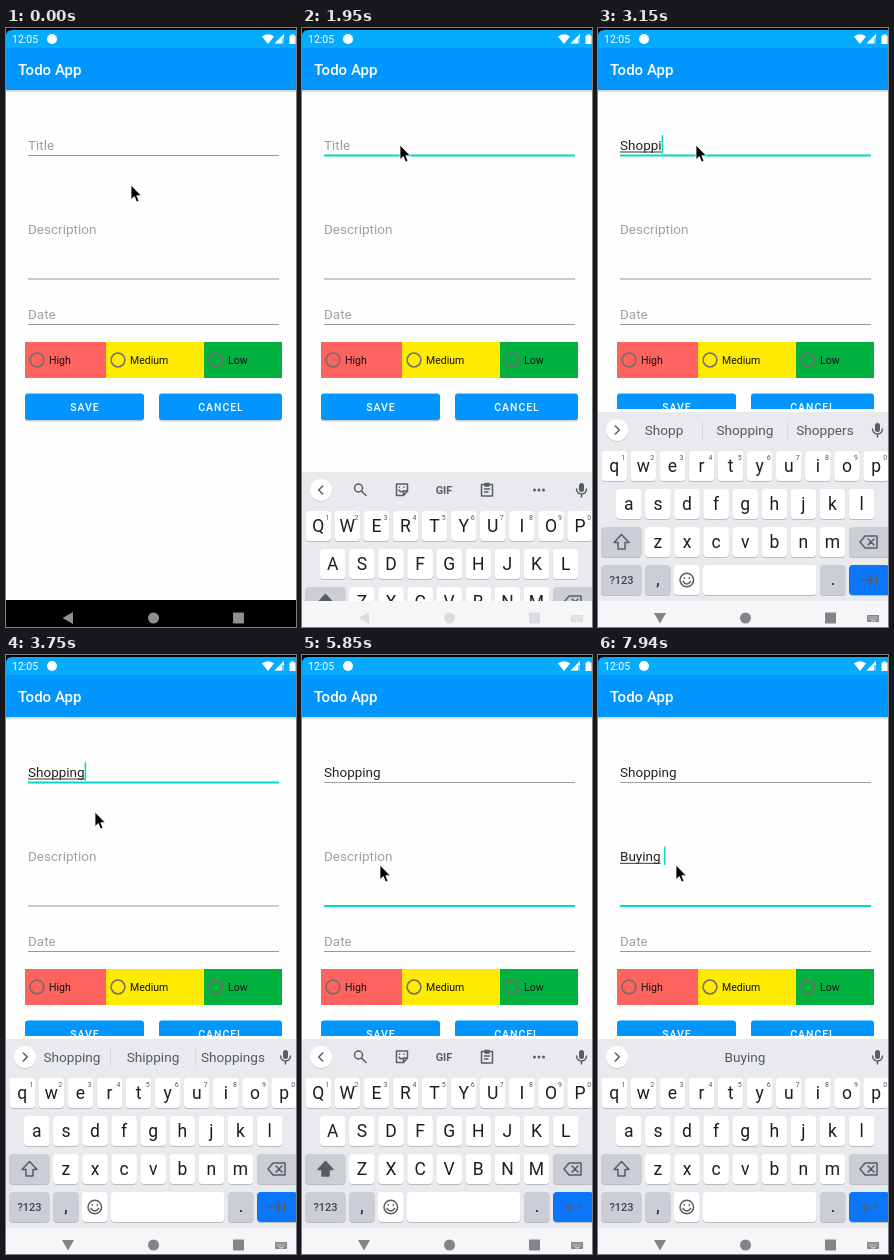
Write an HTML page that moves like this. It is 290 px wide and 599 px high and loops after 8000 ms.

```html
<!DOCTYPE html>
<html lang="en">
<head>
<meta charset="utf-8">
<title>Todo App</title>
<style>
  html, body { margin: 0; width: 100%; height: 100%; overflow: hidden; background: #fff; }
  svg { display: block; width: 100vw; height: 100vh; }
  text { font-family: Roboto, sans-serif; white-space: pre; }
  .mid { text-anchor: middle; }
  .bar { font-size: 15px; font-weight: 500; fill: #fff; }
  .field { font-size: 13.5px; fill: #222; }
  .hint { fill: #a0a0a0; }
  .label { font-size: 10.5px; fill: #111; }
  .button { font-size: 10.5px; font-weight: 500; letter-spacing: .94px; fill: #fff; }
  .key { font-size: 17.5px; fill: #1c1d20; }
  .digit { font-size: 7px; fill: #55585d; }
  .word { font-size: 13.6px; fill: #55595e; }
  .line { fill: none; stroke: #595d62; stroke-width: 1.5; stroke-linecap: round; stroke-linejoin: round; }
</style>
</head>
<body>
<svg viewBox="0 0 290 599" preserveAspectRatio="none">
  <defs>
    <linearGradient id="shade" x2="0" y2="1">
      <stop stop-color="#000" stop-opacity=".2"/><stop offset="1" stop-color="#000" stop-opacity="0"/>
    </linearGradient>
    <clipPath id="clip"><rect id="clipBox" width="295" height="572"/></clipPath>
  </defs>

  <rect width="290" height="599" fill="#fefefe"/>
  <rect width="290" height="10"/>
  <path d="M0 20V8Q0 2 6 2H290V20Z" fill="#06aaff"/>
  <text x="6" y="15" font-size="10.5" fill="#fff">12:05</text>
  <circle cx="46" cy="11" r="5" fill="#fff"/>
  <path d="M256 8.5Q262 4 268 8.5L262 16ZM283.500 7.500H285V6.500H288V7.500H289.500V16H283.500Z" fill="#fff"/>
  <path d="M278 6V15.500H268.500Z" fill="#fff" fill-opacity=".4"/>
  <path d="M278 6V10H276V15.500H268.500Z" fill="#fff"/>
  <rect y="20" width="290" height="42" fill="#0095ff"/>
  <rect y="62" width="290" height="3" fill="url(#shade)"/>
  <text class="bar" x="12" y="47">Todo App</text>

  <g id="form" clip-path="url(#clip)"></g>
  <g id="keyboard"></g>
  <g id="nav">
    <rect id="navBack" y="572" width="290" height="27"/>
    <g id="navIcons">
      <path id="back" d="M56.500 590L67 584V596Z"/>
      <circle cx="147.500" cy="590" r="5.500"/>
      <rect x="227" y="584.500" width="11" height="11" rx="1"/>
      <g id="switcher">
        <rect x="269" y="587" width="12" height="7" rx=".8"/>
        <path id="dots" d="M270.500 589H280M270.500 591H280" stroke-dasharray="1 1" fill="none"/>
        <path id="spaceDot" d="M273 592.800H277.500" fill="none" stroke-width=".8"/>
      </g>
    </g>
  </g>
  <path id="pointer" d="M0 0V14.500L3.300 11.500 5.600 17 8 16 5.800 10.700H10.300Z" stroke="#fff" stroke-width=".8"/>
</svg>

<script>
const $ = id => document.getElementById(id);
const LOOP = 8000, TEAL = '#03dac5';

function add(parent, tag, attrs, text = '') {
  const el = document.createElementNS('http://www.w3.org/2000/svg', tag);
  set(el, attrs);
  el.textContent = text;
  return parent.appendChild(el);
}
function set(el, attrs) {
  for (const name in attrs) el.setAttribute(name, attrs[name]);
}
function show(el, on) {
  el.setAttribute('display', on ? 'inline' : 'none');
}
const write = (parent, cls, x, y, text) => add(parent, 'text', { class: cls, x, y }, text);
const box = (parent, x, y, width, height, fill, rx = 0) =>
  add(parent, 'rect', { x, y, width, height, fill, rx });
const icon = (parent, d, more = {}) => add(parent, 'path', { class: 'line', d, ...more });

// Form
const form = $('form');
function makeField(hint, baseline, lineY) {
  return {
    hint, baseline, lineY,
    text: write(form, 'field', 22, baseline, hint),
    rule: box(form, 22, lineY, 251, 1, '#999'),
    mark: box(form, 22, baseline + 1.8, 0, 1, '#333'),
    caret: box(form, 0, baseline - 14.5, 1.5, 18.5, TEAL)
  };
}
const fields = {
  title: makeField('Title', 121.7, 127),
  note: makeField('Description', 206, 250.5),
  date: makeField('Date', 290.7, 296)
};
[['High', 19, 81, '#ff635f'], ['Medium', 100, 98, '#ffeb00'], ['Low', 198, 78, '#00b140']]
  .forEach(([name, x, width, color]) => {
    box(form, x, 314, width, 36, color);
    add(form, 'circle', { cx: x + 12, cy: 332, r: 6.9, fill: 'none', stroke: '#706f6c', 'stroke-width': 1.5 });
    write(form, 'label', x + 24, 336, name);
  });
[['SAVE', 19, 119], ['CANCEL', 153, 123]].forEach(([name, x, width]) => {
  box(form, x, 367, width, 26.500, '#00000030', 3);
  box(form, x, 365.5, width, 26.500, '#0095ff', 3);
  write(form, 'button mid', x + width / 2 + .5, 383, name);
});

// Keyboard
const board = $('keyboard');
box(board, 0, 384, 295, 216, '#e8eaed');
function makeKey(x, y, width, fill = '#fff') {
  box(board, x, y + 1, width, 30, '#b9bcc1', 4);
  box(board, x, y, width, 30, fill, 4);
}
const letters = [];
['qwertyuiop', 'asdfghjkl', 'zxcvbnm'].forEach((row, r) => {
  [...row].forEach((letter, i) => {
    const x = [16.2, 30.8, 59.9][r] + i * 29.1, y = 423 + r * 38;
    makeKey(x - 12.8, y, 25.6);
    letters.push(write(board, 'key mid', x, y + 21, letter));
    if (!r) write(board, 'digit mid', x + 9, y + 9, (i + 1) % 10);
  });
});
const GREY = '#cbced4';
[[3, 499, 40.5, GREY], [251, 499, 40.5, GREY], [3, 537, 40.5, GREY], [47, 537, 25.6, GREY],
 [76, 537, 25.6], [105, 537, 113.5], [222, 537, 25.6, GREY], [251, 537, 40.5, '#0a76fb']]
  .forEach(key => makeKey(...key));
write(board, 'mid', 23.5, 556, '?123').style.cssText = 'font-size:11px;font-weight:500;fill:#404348';
write(board, 'key mid', 60, 557, ',');
write(board, 'key mid', 235, 557, '.');
const shift = icon(board, 'M23.500 506.500L31 514.500H27V521H20V514.500H16Z');
icon(board, 'M262 514L267 508H279V520H267ZM270 511L276 517M276 511L270 517');
add(board, 'circle', { class: 'line', cx: 88.800, cy: 552, r: 6.800 });
icon(board, 'M86.300 549.800V550.200M91.300 549.800V550.200', { 'stroke-width': 2 });
icon(board, 'M85 553.500Q88.800 558.500 92.600 553.500');
const WHITE = { stroke: '#fff', 'stroke-width': 1.8 };
const tabIcon = icon(board, 'M262.500 552H275M270.500 547.500L275 552 270.500 556.500M278.500 547V557', WHITE);
const enterIcon = icon(board, 'M278 548V552.500H264.500M268.500 548.500L264.500 552.500 268.500 556.500', WHITE);

// Strip above the keys
add(board, 'circle', { cx: 19, cy: 403, r: 11, fill: '#c9ccd0' });
add(board, 'circle', { cx: 19, cy: 402, r: 11, fill: '#fff' });
const chevron = icon(board, 'M17.300 398L21.300 402 17.300 406');
box(board, 277, 395, 5, 9, '#595d62', 2.5);
icon(board, 'M274.500 401Q275 406 279.500 406T284.500 401M279.500 406V409');

const tools = add(board, 'g', {});
add(tools, 'circle', { class: 'line', cx: 56.500, cy: 400, r: 4 });
icon(tools, 'M59.700 403.200L64 407.500');
icon(tools, 'M94.500 396H105.500V403L101.500 407.500H94.500ZM105.500 403H101.500V407M97 402Q99 405 101 403M97.500 399V399.300M102 399V399.300');
write(tools, 'mid', 142, 405.5, 'GIF').style.cssText = 'font-size:11px;font-weight:700;fill:#595d62';
icon(tools, 'M179.500 396.500H190.500V408H179.500ZM183 395.500H187V398H183ZM182.500 401H187.500M182.500 404H186');
[-4.5, 0, 4.5].forEach(dx => add(tools, 'circle', { cx: 237 + dx, cy: 402, r: 1.5, fill: '#595d62' }));

const strip = add(board, 'g', {});
const dividers = [104, 189].map(x => box(strip, x, 394, 1, 17, '#d3d6da'));
const words = [66, 147, 227].map(x => write(strip, 'word mid', x, 406.7, ''));

// Each step lists only what changes at that time.
const steps = [
  [0, { x: 125, y: 157, focus: '', caret: 0, title: '', note: '', typing: '', drop: 300,
        nav: 'dark', switcher: 0, upper: 1, tools: 1, words: [], enter: 0 }],
  [150, { x: 111, y: 136 }],
  [300, { x: 98, y: 117 }],
  [900, { focus: 'title', caret: 1 }],
  [1500, { switcher: 1 }],
  [1800, { caret: 0 }],
  [1950, { drop: 60, nav: 'faint' }],
  [2100, { drop: 0 }],
  [2250, { nav: 'light', caret: 1 }],
  [2400, { title: 'S', typing: 'title', upper: 0 }],
  [2550, { title: 'Sh', tools: 0, words: ['S', 'So', 'She'] }],
  [2700, { title: 'Sho', words: ['Sho', 'Show', 'Shot'] }],
  [2850, { title: 'Shop', words: ['Shop', 'Shopping', 'Shops'] }],
  [3150, { title: 'Shoppi', words: ['Shopp', 'Shopping', 'Shoppers'] }],
  [3300, { title: 'Shoppin' }],
  [3450, { title: 'Shopping' }],
  [3600, { words: ['Shopping', 'Shipping', 'Shoppings'] }],
  [3750, { x: 89, y: 157 }],
  [3900, { x: 78, y: 210 }],
  [4050, { focus: 'note', typing: '' }],
  [4200, { enter: 1 }],
  [4500, { tools: 1 }],
  [4650, { caret: 0 }],
  [5250, { caret: 1 }],
  [5700, { caret: 0, upper: 1 }],
  [6000, { note: 'B', typing: 'note', caret: 1, upper: 0 }],
  [6150, { tools: 0, words: ['B', 'But', 'By'] }],
  [6600, { note: 'Bu' }],
  [6900, { words: ['Bu', 'But', 'Buy'] }],
  [7050, { note: 'Buy' }],
  [7200, { words: ['Buy', 'Buying', 'But'] }],
  [7500, { note: 'Buyi' }],
  [7650, { note: 'Buyin', words: ['Buyin', 'Buying', 'But'] }],
  [7800, { note: 'Buying' }],
  [7940, { note: 'Buying ', words: ['', 'Buying', ''] }]
];
const navLooks = {
  dark: ['#000', '#8f8f8f'], faint: ['#f6f6f8', '#d9dbde'], light: ['#f6f6f8', '#828487']
};

function drawField(name, s) {
  const f = fields[name], value = s[name] || '', focused = s.focus === name;
  f.text.textContent = value || f.hint;
  f.text.setAttribute('class', value ? 'field' : 'field hint');
  set(f.rule, { y: f.lineY - (focused ? .5 : 0), height: focused ? 2 : 1, fill: focused ? TEAL : '#999' });
  const width = count => count ? f.text.getSubStringLength(0, count) : 0;
  set(f.mark, { width: s.typing === name ? width(value.trim().length) : 0 });
  set(f.caret, { x: 22 + width(value.length) });
  show(f.caret, focused && s.caret);
}

function draw(s) {
  for (const name in fields) drawField(name, s);
  set($('clipBox'), { height: s.drop ? 572 : 381 });
  set(board, { transform: `translate(0 ${s.drop})` });
  show(board, s.drop < 300);
  for (const el of letters) {
    el.textContent = s.upper ? el.textContent.toUpperCase() : el.textContent.toLowerCase();
  }
  shift.style.fill = s.upper ? '#595d62' : 'none';
  show(tabIcon, !s.enter);
  show(enterIcon, s.enter);
  show(tools, s.tools);
  show(strip, !s.tools);
  set(chevron, { transform: s.tools ? 'rotate(180 19 402)' : '' });
  words.forEach((el, i) => el.textContent = s.words[i] || '');
  dividers.forEach(el => show(el, s.words[0]));

  const [back, front] = navLooks[s.nav];
  set($('navBack'), { fill: back, y: s.nav === 'dark' ? 572 : 573 });
  set($('navIcons'), { fill: front });
  set($('dots'), { stroke: back });
  set($('spaceDot'), { stroke: back });
  set($('back'), { transform: s.nav === 'light' ? 'rotate(-90 62 590)' : '' });
  show($('switcher'), s.switcher);
  set($('pointer'), { transform: `translate(${s.x} ${s.y})` });
}

let shown = -1;
function tick() {
  const time = performance.now() % LOOP;
  const past = steps.filter(([start]) => start <= time);
  if (past.length !== shown) {
    shown = past.length;
    draw(Object.assign({}, ...past.map(([, change]) => change)));
  }
  requestAnimationFrame(tick);
}
tick();
document.fonts.ready.then(() => shown = -1);
</script>
</body>
</html>
```
